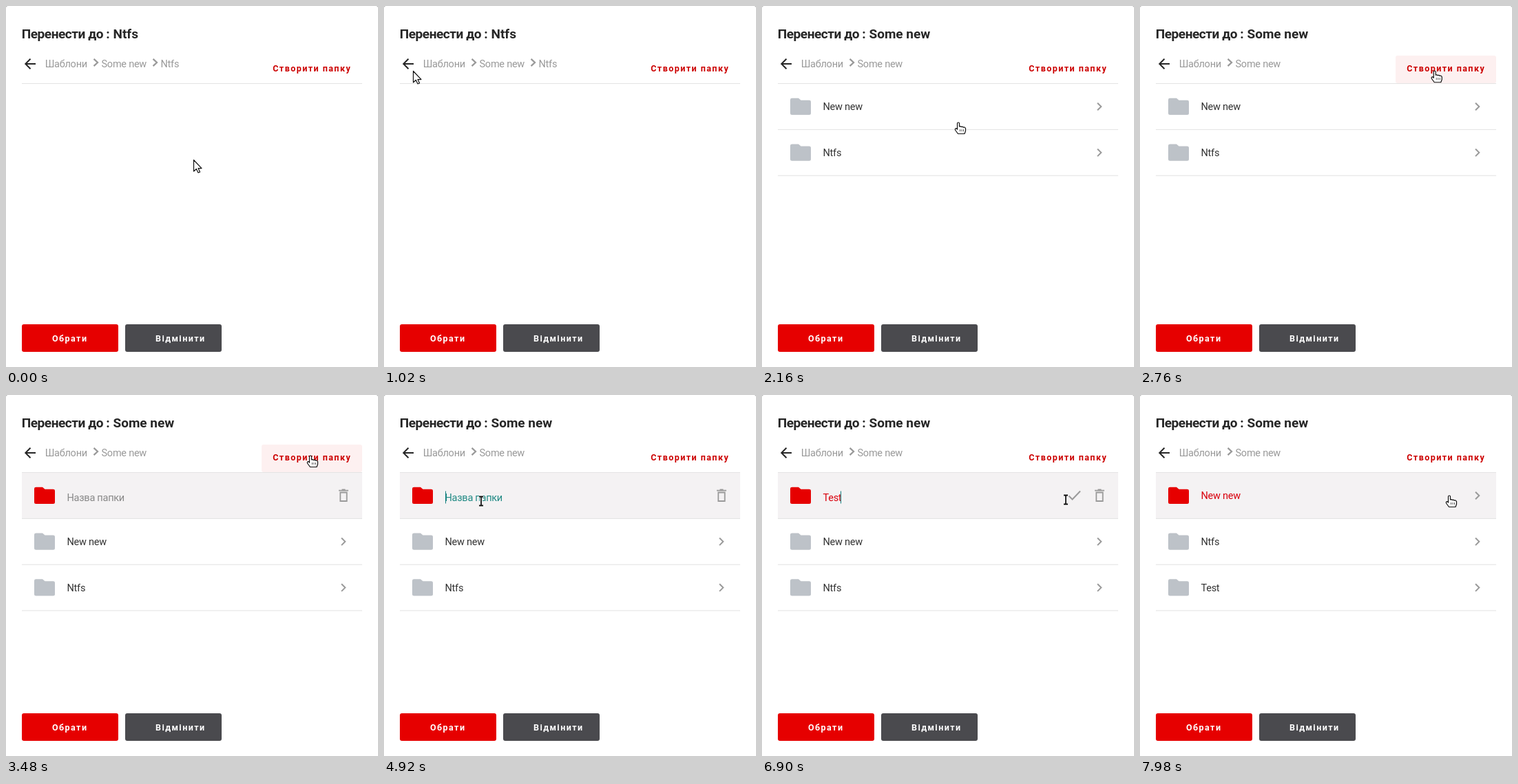
Write an HTML page that moves like this. It is 540x524 px and loops after 8000 ms.

```html
<!DOCTYPE html>
<html lang="uk">
<head>
<meta charset="utf-8">
<style>
  html, body { margin: 0; width: 100%; height: 100%; overflow: hidden; background: #fff; }
  svg { display: block; width: 540px; height: 524px; }
  text { font: 14.5px Roboto, "Noto Sans", sans-serif; letter-spacing: -.25px; fill: #333; white-space: pre; }
  .title { font-size: 19px; font-weight: 700; letter-spacing: 0; fill: #262626; }
  .lead { letter-spacing: -.45px; }
  .btn { font-size: 12.5px; font-weight: 700; letter-spacing: 1.45px; fill: #fff; }
  .create { fill: #cc0000; }
  .crumb { fill: #999; }
  .line { fill: none; stroke: #9a9a9a; stroke-width: 2; }
  .cursor { fill: #fff; stroke: #111; stroke-width: 1.2; stroke-linejoin: round; }
</style>
</head>
<body>
<svg id="stage" viewBox="0 0 540 524"></svg>
<script>
const LOOP = 8000, STEP = 60, PITCH = 66.8;
const BACK = 1320, CREATE = 3120, FOCUS = 4740, SAVE = 7620;
const KEYS = [5460, 5580, 5640, 5760];
const CARET_X = [89.5, 97, 104.5, 111, 114.5];
const CARET_ON = [[4800, 5300], [5460, 6240], [6760, 7260]];

// time, x, y of the pointer
const PATH = [
  [0, 272, 223], [840, 68, 108], [1020, 42, 94], [1140, 34, 82], [1740, 34, 82],
  [1980, 150, 196], [2160, 285, 169], [2580, 385, 113], [2820, 442, 88], [3480, 442, 88],
  [3720, 370, 118], [4260, 146, 152], [4380, 141, 154], [6360, 141, 154],
  [6600, 220, 172], [6900, 441, 152], [7140, 449, 146], [8000, 449, 146]
];
const SHAPES = [
  [0, 'arrow'], [1080, 'hand'], [1860, 'arrow'], [1920, 'hand'], [3600, 'arrow'],
  [4080, 'beam'], [6960, 'hand'], [7680, 'arrow'], [7980, 'hand']
];
const CURSORS = {
  arrow: '<path d="M.5 .5V17L4.3 13.5 7 19 9.6 18 7 12.6H12Z"/>',
  hand: '<path d="M-1.5 10V1.5Q-1.5 0 0 0T1.5 1.5V6Q3 5 4.3 6.5 6 5.6 7.2 7.2 9.2 6.4 10.5 8.5V12.5L9 16.5H-.5L-4.5 11Q-5 8.5-3 8.5Z"/>' +
    '<path d="M2.5 10v3M5 10v3M7.5 10v3" stroke-width=".7"/>',
  beam: '<path d="M-3 -7H3M-3 7H3M0 -7V7" stroke="#fff" stroke-width="4"/>' +
    '<path d="M-3 -6.5H3M-3 6.5H3M0 -6.5V6.5" stroke-width="1.8"/>'
};

const stage = document.getElementById('stage');
const text = (x, y, s, cls = '', style = '') => `<text x="${x}" y="${y}" class="${cls}" style="${style}">${s}</text>`;
const box = (x, y, w, h, fill, extra = '') => `<rect x="${x}" y="${y}" width="${w}" height="${h}" fill="${fill}" ${extra}/>`;
const line = (d, extra = '') => `<path class="line" d="${d}" ${extra}/>`;
const rule = y => box(23, y, 494, 1.1, '#e4e4e4');
const button = (x, fill, label) => box(x, 462, 140, 40, fill, 'rx="3"') + text(x + 44, 487, label, 'btn');
const crumbArrow = x => line(`M${x} 76.8l5.5 5.2-5.5 5.2`, 'style="stroke-width:2.3"');

function pointer(t) {
  const i = PATH.findIndex(p => p[0] > t);
  const [a, b] = [PATH[i - 1], PATH[i]];
  const k = (t - a[0]) / (b[0] - a[0]);
  return [a[1] + (b[1] - a[1]) * k, a[2] + (b[2] - a[2]) * k];
}

function rowBase(i, active) {
  const y = 112 + i * PITCH;
  const fill = active ? '#e60000' : '#bdc2c8';
  return (active ? box(23, y + 1, 494, PITCH, '#f4f2f3') : '') + rule(y + PITCH) +
    `<path fill="${fill}" d="M43.5 ${y + 21.7}H53L56.5 ${y + 24.7}H68.5Q71 ${y + 24.7} 71 ${y + 27}V${y + 43.5}Q71 ${y + 46} 68.5 ${y + 46}H43.5Q41 ${y + 46} 41 ${y + 43.5}V${y + 24}Q41 ${y + 21.7} 43.5 ${y + 21.7}Z"/>`;
}

function folder(name, i, active) {
  const y = 112 + i * PITCH;
  return rowBase(i, active) + text(88.5, y + 39, name, '', active ? 'fill:#d9000d' : '') +
    line(`M487 ${y + 28.7}l5.3 5.3-5.3 5.3`);
}

function editor(t) {
  const n = KEYS.filter(k => t >= k).length;
  const mix = Math.min(1, Math.max(0, (t - FOCUS) / 180));
  const tint = [[136, 32], [136, 138], [136, 132]].map(([a, b]) => Math.round(a + (b - a) * mix));
  const caret = CARET_ON.some(([a, b]) => t >= a && t < b);
  return rowBase(0, true) +
    (n ? text(88.5, 154, 'Test'.slice(0, n), '', 'fill:#d9000d') + line('M445.5 146.5l5 5L462 139.5')
       : text(88.5, 154, 'Назва папки', '', `fill:rgb(${tint})`)) +
    (caret ? box(CARET_X[n] - .5, 139.5, 1, 18, '#147f7f') : '') +
    line('M485.3 141.5h9.4v12.5h-9.4zM483 138.6h14M487.5 137.3h5', 'style="stroke-width:1.8"');
}

function list(t) {
  if (t < BACK) return '';
  if (t >= SAVE) return ['New new', 'Ntfs', 'Test'].map((s, i) => folder(s, i, i === 0)).join('');
  const shift = t >= CREATE ? 1 : 0;
  return (shift ? editor(t) : '') + folder('New new', shift) + folder('Ntfs', shift + 1);
}

function draw(t) {
  const [x, y] = pointer(t);
  const inside = t < BACK;
  const overCreate = x > 371 && y > 72 && y < 112;
  const shape = SHAPES.filter(s => s[0] <= t).pop()[1];
  stage.innerHTML =
    box(0, 0, 540, 10, '#aaa') + box(0, 0, 540, 540, '#fff', 'rx="3"') +
    text(22.8, 47, 'Перенести до :', 'title lead') +
    text(155.5, 47, inside ? 'Ntfs' : 'Some new', 'title') +
    line('M43 84H28.5M35.5 76.8L28.3 84l7.2 7.2', 'style="stroke:#262626"') +
    text(56.7, 89, 'Шаблони', 'crumb') + crumbArrow(127.5) +
    text(138.5, 89, 'Some new', 'crumb') +
    (inside ? crumbArrow(213.5) + text(224.5, 89, 'Ntfs', 'crumb') : '') +
    (overCreate ? box(371, 72, 146, 40, '#fdf0f0', 'rx="3"') : '') +
    text(387.2, 95, 'Створити папку', 'btn create') +
    rule(112) + list(t) +
    button(23, '#e60000', 'Обрати') + button(173, '#4a4a4e', 'Відмінити') +
    `<g class="cursor" transform="translate(${x} ${y})">${CURSORS[shape]}</g>`;
}

let shown = -1;
function tick() {
  const t = Math.floor(performance.now() % LOOP / STEP) * STEP;
  if (t !== shown) draw(shown = t);
  requestAnimationFrame(tick);
}
tick();
</script>
</body>
</html>
```
